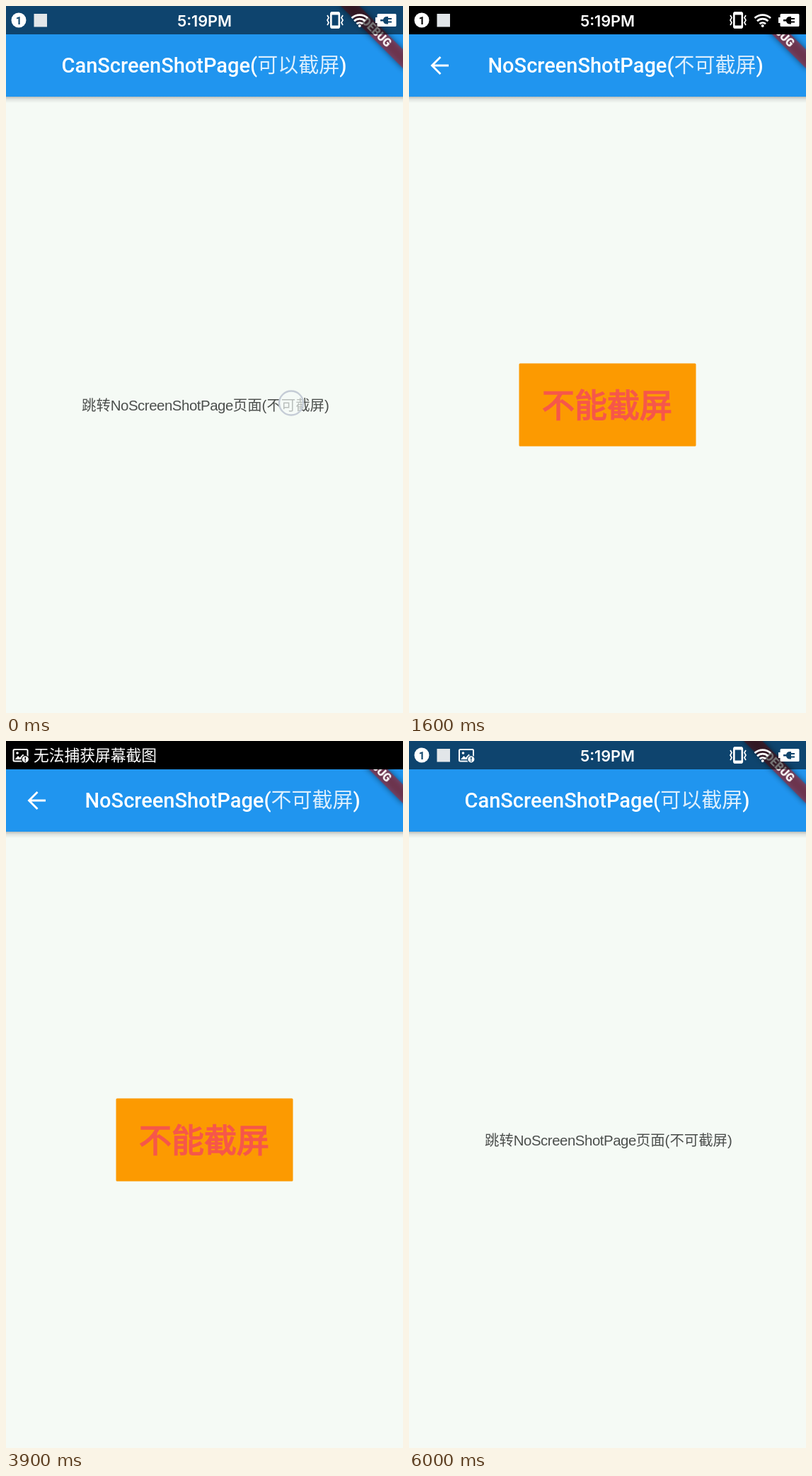
Write an HTML page that moves like this. It is 561x998 px and loops after 6100 ms.

```html
<!DOCTYPE html>
<html lang="zh">
<head>
<meta charset="utf-8">
<title>Screenshot guard</title>
<style>
html, body { margin: 0; width: 100%; height: 100%; overflow: hidden; background: #f5faf5; }
svg { display: block; width: 561px; height: 998px; overflow: hidden; }
text { white-space: pre; }
.title { font: 500 29px Roboto, "Noto Sans CJK SC", "Noto Sans CJK", sans-serif; fill: #fff; }
.title tspan { font-weight: 300; fill-opacity: .85; }
.link { font: 20.4px "Liberation Sans", "Noto Sans CJK SC", "Noto Sans CJK", sans-serif; fill: #4c4f4d; }
.link tspan { letter-spacing: -.45px; }
.notice { font: 400 46px "Noto Sans CJK SC", "Noto Sans CJK", sans-serif; fill: #f6574a; stroke: #f6574a; stroke-width: 1.6px; }
.clock { font: 600 21.7px Inter, sans-serif; }
.count { font: 700 15px Roboto, sans-serif; fill: currentColor; }
.message { font: 400 21.75px "Noto Sans CJK SC", "Noto Sans CJK", sans-serif; }
.debug { font: 900 15.9px Roboto, sans-serif; fill: #fff; }
.ink { fill: currentColor; }
.line { fill: none; stroke: #fff; }

/* 6100 ms loop */
.tap, .page, .scrim, .status, .icons, .alert, .ticker { animation: 6100ms linear infinite; }
.tap { animation-name: tap; animation-timing-function: step-end; }
.page { animation-name: slide, fade; }
.scrim { animation-name: scrim; animation-timing-function: step-end; }
.status { animation-name: ink; animation-timing-function: step-end; }
.icons { animation-name: icons; }
.alert { animation-name: alert; animation-timing-function: step-end; }
.ticker { animation-name: ticker; }

@keyframes tap { 0% { opacity: 1; } 6.4%, 100% { opacity: 0; } }
@keyframes slide {
  0%, 13.115% { transform: translateY(11px); animation-timing-function: ease-out; }
  14.426% { transform: none; }
  81.639% { transform: none; animation-timing-function: cubic-bezier(.8, 0, .6, 1); }
  86.557%, 100% { transform: translateY(239.5px); }
}
@keyframes fade {
  0%, 12.295% { opacity: 0; }
  12.296% { opacity: .55; }
  14.426% { opacity: 1; }
  81.639% { opacity: 1; animation-timing-function: ease-out; }
  86.557%, 100% { opacity: 0; }
}
@keyframes scrim { 0%, 94.262%, 100% { opacity: .54; } 10.656% { opacity: 1; } }
@keyframes ink { 0%, 94.262%, 100% { color: #0f456c; } 10.656% { color: #000; } }
@keyframes icons {
  0%, 44.262% { transform: none; opacity: 1; }
  47.541%, 90.164% { transform: translateY(-40px); opacity: 0; }
  93.443%, 100% { transform: none; opacity: 1; }
}
@keyframes alert { 0% { opacity: 0; } 49%, 100% { opacity: 1; } }
@keyframes ticker {
  0%, 44.262% { transform: translateY(40px); opacity: 0; }
  47.541%, 90.164% { transform: none; opacity: 1; }
  93.443%, 100% { transform: translateY(40px); opacity: 0; }
}
</style>
</head>
<body>
<svg viewBox="0 0 561 998">
  <defs>
    <linearGradient id="drop" x2="0" y2="1">
      <stop stop-color="#000" stop-opacity=".24"/>
      <stop offset=".4" stop-color="#000" stop-opacity=".09"/>
      <stop offset="1" stop-color="#000" stop-opacity="0"/>
    </linearGradient>
    <filter id="blur" x="-20%" y="-80%" width="140%" height="260%"><feGaussianBlur stdDeviation="4"/></filter>
    <clipPath id="strip"><path d="M0 0H561V40H0z"/></clipPath>
    <g id="screen">
      <path fill="#f5faf5" d="M0 0H561V998H0z"/>
      <path fill="url(#drop)" d="M0 128H561V137H0z"/>
      <path fill="#2095ef" d="M0 0H561V128H0z"/>
    </g>
    <g id="photo">
      <rect x="1" y="1" width="20" height="16.5" rx="1.5" class="line" stroke-width="2"/>
      <circle cx="6.5" cy="6" r="1.8"/>
      <path d="M3 15L7.5 10L10 12.5L14.5 7.5L19 13V15z"/>
      <circle cx="17.8" cy="14.8" r="5.8" class="ink"/>
      <circle cx="17.8" cy="14.8" r="4.6"/>
      <path class="ink" d="M17 11.8h1.6v3.6H17zM17 16.4h1.6v1.5H17z"/>
    </g>
  </defs>

  <use href="#screen"/>
  <text class="title" x="78.5" y="94">CanScreenShotPage(<tspan>可以截屏</tspan>)</text>
  <text class="link" x="107" y="570.5">跳转<tspan>NoScreenShotPage</tspan>页面(不可截屏)</text>
  <circle class="tap" cx="403" cy="560.5" r="17" fill="#f5faf8" fill-opacity=".65" stroke="#c5ccd6" stroke-width="2.4"/>

  <g class="page">
    <use href="#screen"/>
    <path class="line" stroke-width="2.9" d="M56 84H33M44.5 72L32.5 84L44.5 96"/>
    <text class="title" x="111.5" y="94">NoScreenShotPage(<tspan>不可截屏</tspan>)</text>
    <rect x="155.5" y="504.5" width="250" height="117" rx="1.5" fill="#fc9a01"/>
    <text class="notice" x="280" y="580" text-anchor="middle">不能截屏</text>
  </g>

  <g transform="translate(561) rotate(45)">
    <path d="M-64 43.6H64V62.3H-64z" fill-opacity=".5" filter="url(#blur)"/>
    <path d="M-64 43.6H64V62.3H-64z" fill="#a82430" fill-opacity=".6"/>
    <text class="debug" y="58.3" text-anchor="middle">DEBUG</text>
  </g>

  <path class="scrim" d="M0 0H561V40H0z"/>
  <g class="status" clip-path="url(#strip)" fill="#fff">
    <g class="icons">
      <circle cx="18" cy="20" r="10.5"/>
      <text class="count" x="18" y="25.5" text-anchor="middle">1</text>
      <path fill="#e2e6e9" d="M39.5 11H58V29.5H39.5z"/>
      <use class="alert" href="#photo" x="70" y="11"/>
      <text class="clock" x="280.5" y="28.5" text-anchor="middle">5:19PM</text>
      <rect x="459.3" y="9.5" width="11.5" height="21" rx="1.5" class="line" stroke-width="2.6"/>
      <path d="M459 8.5h12v4h-12zM459 27.5h12v4h-12z"/>
      <path class="line" stroke-width="1.7" d="M454 13l2 3.5l-2 3.5l2 3.5l-2 3.5M476 13l-2 3.5l2 3.5l-2 3.5l2 3.5"/>
      <path class="line" stroke-width="2.7" d="M488.5 17a16.5 16.5 0 0 1 22.5 0M492 21.3a11.3 11.3 0 0 1 15.5 0M495.5 25.3a6.3 6.3 0 0 1 8.5 0"/>
      <circle cx="499.7" cy="28" r="2"/>
      <path d="M526 11H550q1.5 0 1.5 1.5V27.5q0 1.5-1.5 1.5H526q-1.5 0-1.5-1.5V24H522V16h2.5V12.5q0-1.5 1.5-1.5z"/>
      <path class="ink" d="M529 19h4q1-4 5-4h2v2h5v2h-5v2.5h5v2h-5v2h-2q-4 0-5-4h-4z"/>
    </g>
    <g class="ticker">
      <use href="#photo" x="9.5" y="11"/>
      <text class="message" x="39" y="28.3">无法捕获屏幕截图</text>
    </g>
  </g>
</svg>
</body>
</html>
```
